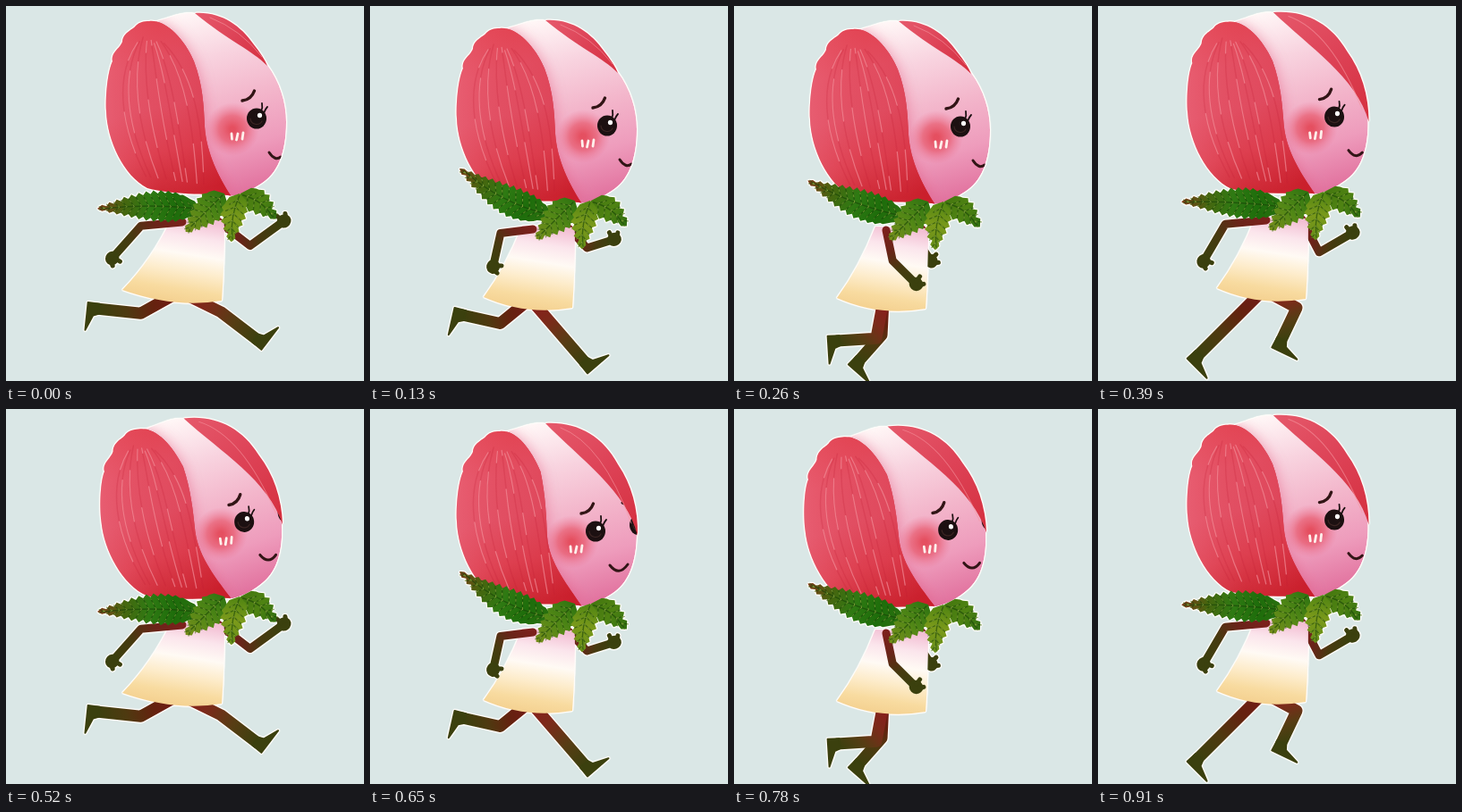
Recreate the animation shown at these times as an HTML page with a canvas. Size 400 by 420 pixels, loop 1040 ms.

```html
<!DOCTYPE html>
<html lang="en">
<head>
<meta charset="utf-8">
<title>Running tulip</title>
<style>
html, body { margin: 0; width: 100%; height: 100%; overflow: hidden; background: #dae7e6; }
canvas { display: block; }
</style>
</head>
<body>
<canvas id="stage" width="400" height="420"></canvas>
<script>
const STEP = 130;
const STEPS = 8;
const WIDTH = 400;
const HEIGHT = 420;
const INK = '#1c1011';
const BARK = '#3b400e';

// Everything hangs from the collar. Limbs end at x, y and bow out by a bend.
const NEAR_SHOULDER = [-47, 32];
const FAR_SHOULDER = [-7, 31];
const HIP = [-50, 110];
const poses = [
  { collar: [244, 210], lift: 0, sway: 12,
    nearArm: [-124, 71, 17], farArm: [65, 32, 27], farLeg: [-143, 129, 15], nearLeg: [37, 164, 5] },
  { collar: [229, 218], lift: 0.48, sway: 0,
    nearArm: [-91, 72, 21], farArm: [42, 44, 16], farLeg: [-126, 128, 19], nearLeg: [12, 182, 0] },
  { collar: [217, 219], lift: 0.36, sway: 0,
    nearArm: [-15, 91, 10], farArm: [2, 65, 6], farLeg: [-78, 179, 13], nearLeg: [-102, 156, 27] },
  { collar: [235, 208], lift: 0.05, sway: 0,
    nearArm: [-116, 76, 21], farArm: [48, 47, 30], farLeg: [-124, 184, 0], nearLeg: [-31, 168, 29] }
];

function makeLayer() {
  const canvas = document.createElement('canvas');
  canvas.width = WIDTH;
  canvas.height = HEIGHT;
  return canvas.getContext('2d');
}

const stage = document.getElementById('stage').getContext('2d');
const g = makeLayer();
const mask = makeLayer();

function random(seed) {
  const v = Math.sin(seed * 91.7) * 4375.5;
  return v - Math.floor(v);
}

function gradient(x0, y0, x1, y1, ...colors) {
  const paint = g.createLinearGradient(x0, y0, x1, y1);
  colors.forEach((c, i) => paint.addColorStop(i / (colors.length - 1), c));
  return paint;
}

function fill(path, style) {
  g.fillStyle = style;
  g.fill(new Path2D(path));
}

function line(path, style, width) {
  g.strokeStyle = style;
  g.lineWidth = width;
  g.stroke(new Path2D(path));
}

function disc(x, y, rx, ry, style) {
  g.fillStyle = style;
  g.beginPath();
  g.ellipse(x, y, rx, ry, 0, 0, 7);
  g.fill();
}

// Draws a jointed limb and returns the angle of its lower half.
function limb([x0, y0], [x1, y1], bend, width, ...colors) {
  const dx = x1 - x0, dy = y1 - y0, d = Math.hypot(dx, dy);
  const jx = (x0 + x1) / 2 - dy / d * bend;
  const jy = (y0 + y1) / 2 + dx / d * bend;
  line(`M${x0} ${y0}L${jx} ${jy}L${x1} ${y1}`, gradient(x0, y0, x1, y1, ...colors), width);
  return Math.atan2(y1 - jy, x1 - jx);
}

// Continues a limb: local y runs along it, local x points forward.
function atEnd(x, y, angle, paint) {
  g.save();
  g.translate(x, y);
  g.rotate(angle - Math.PI / 2);
  paint();
  g.restore();
}

function arm(shoulder, [x, y, bend]) {
  const angle = limb(shoulder, [x, y], bend, 9, '#7c201c', '#6a2419', '#473a10', BARK);
  atEnd(x, y, angle, () => {
    disc(0, 2, 7.5, 8, BARK);
    line('M3 0L9 -1M2 6L6 8', BARK, 5);
  });
}

function leg([x, y, bend], ...colors) {
  const angle = limb(HIP, [x, y], -bend, 13, ...colors, BARK);
  atEnd(x, y, angle, () => {
    const foot = 'M-5.5 -3L-6 10L25 10L8 3L5.5 -3Z';
    fill(foot, BARK);
    line(foot, BARK, 2);
  });
}

function leaf(x, y, angle, length, half, bend, ...colors) {
  const teeth = Math.round(length / 8);
  const mid = t => bend * Math.sin(Math.PI * t);
  const edge = t => half * Math.sin(Math.PI * t ** 0.65);
  const tooth = (t, side) => [
    [t * length - 2, mid(t) + side * edge(t) * 0.86],
    [t * length + 3, mid(t) + side * (edge(t) + 1)]
  ];
  const upper = [], lower = [];
  let veins = '';
  for (let i = 1; i < teeth; i++) {
    const t = i / teeth, vx = t * length, vy = mid(t), reach = edge(t) * 0.7;
    upper.push(...tooth(t, -1));
    lower.push(...tooth(t, 1));
    veins += `M${vx} ${vy}L${vx + 6} ${vy + reach}M${vx} ${vy}L${vx + 6} ${vy - reach}`;
  }
  g.save();
  g.translate(x, y);
  g.rotate(angle);
  fill('M' + [[0, 0], ...lower, [length, 0], ...upper.reverse()].join('L') + 'Z',
    gradient(0, 0, length, 0, ...colors));
  line(veins, 'rgba(22,66,8,.55)', 1.3);
  line(`M3 0Q${length / 2} ${bend * 2} ${length - 6} 0`, 'rgba(24,66,8,.6)', 1.4);
  g.setLineDash([2, 4]);
  line(veins, 'rgba(182,204,84,.6)', 0.8);
  g.restore();
}

function collarLeaves(lift) {
  leaf(-27, 17, Math.PI + lift, 115, 17, 3 - 20 * lift, '#2c7010', '#1e6d0b', '#2f7a13', '#47650f', '#7f3a1a');
  leaf(18, 0, 0.62, 49, 14, -4, '#44770f', '#4f8313', '#2f6d10');
  leaf(0, 0, 2.36, 61, 17, 0, '#2f7411', '#538816', '#778d1b');
  leaf(17, 0, 1.74, 55, 14, 3, '#4f8412', '#7b9a1b', '#668e18');
}

function dress(sway) {
  fill(`M-59 28Q${-77 - sway / 3} 74 ${-102 - sway} 108Q-55 129 -3 120Q0 80 0 30Z`,
    gradient(-40, 28, -56, 126, '#f3bfd4', '#fbe5ec', '#fffaf4', '#fdeccb', '#f8dba0', '#f3ce8c'));
}

function eye(x, y) {
  disc(x, y, 11, 11.5, INK);
  line(`M${x - 7} ${y}A7 7 0 0 0 ${x + 6} ${y + 3}`, '#3c2523', 1.2);
  disc(x + 3.5, y - 3.5, 2.6, 2.8, '#fff');
}

function face(turn) {
  g.save();
  g.translate(-13 * turn, 3 * turn);
  const blush = g.createRadialGradient(253, 138, 3, 253, 138, 30);
  blush.addColorStop(0, 'rgba(226,58,72,.8)');
  blush.addColorStop(0.45, 'rgba(230,74,92,.6)');
  blush.addColorStop(1, 'rgba(236,110,140,0)');
  disc(253, 138, 30, 30, blush);
  line('M252 143L252.5 149M259 143L257.5 150M265 142L264 149', '#fff0ec', 2.8);
  line('M264 106Q274 105 277.5 95', '#321516', 3.4);
  line('M285 118Q287 114 286 109M288 120Q290 115 292 113', INK, 1.8);
  eye(280, 126);
  if (turn > 0.5) {
    eye(329, 119);
    line('M310 94L318 97', '#321516', 3);
  }
  g.restore();
  const a = 294 - 11 * turn, b = 307 - 4 * turn;
  line(`M${a} ${164 + 3 * turn}Q${(a + b) / 2} ${174 + 6 * turn} ${b} ${169 - 3 * turn}`, '#321516', 3);
}

function sidePetalPath(s) {
  return `M160 17C178 15 ${199 + s / 2} 36 ${210 + s / 2} 62C${220 + s} 88 ${221 + s} 112 ${222 + s} 135
    C${224 + s} 165 238 192 251 212C225 211 182 211 158 204C131 190 113 150 112 118
    C111 98 114 72 119 62C117 52 127 48 130 40C131 29 143 26 145 22C149 18 154 17 160 17Z`;
}

function sidePetal(s) {
  const path = sidePetalPath(s);
  fill(path, gradient(142, 18, 188, 212, '#e2414f', '#e24d60', '#e04c60', '#dc3c4c', '#c9212c'));
  fill(path, gradient(110, 0, 240, 0, 'rgba(242,120,140,.4)', 'rgba(230,85,105,.1)', 'rgba(205,25,45,.25)'));
  for (let i = 0; i < 9; i++) {
    const u = (i + 0.3 + 0.6 * random(i + 1)) / 9;
    const streak = `M${144 + 34 * u} ${34 + 8 * random(i + 5)}C${114 + 100 * u} 76
      ${116 + (108 + s) * u} 130 ${150 + 74 * u} ${190 + 10 * u}`;
    line(streak, 'rgba(190,30,50,.22)', 1.4);
    g.setLineDash([20 + 50 * random(i + 9), 30 + 30 * random(i + 13)]);
    g.lineDashOffset = 90 * random(i + 17);
    line(streak, 'rgba(250,155,165,.6)', 1.3);
    g.setLineDash([]);
  }
}

function backPetal(turn) {
  const r = Math.min(1, turn * 3);
  const x = 292 + 21 * r, y = 67 + 63 * r;
  const path = `M211 8C${240 + 6 * r} 6 ${262 + 13 * r} 22 ${276 + 16 * r} ${42 + 12 * r}
    Q${288 + 27 * r} ${57 + 31 * r} ${x + r} ${y + 4 * r}C${274 + 28 * r} ${49 + 35 * r} 250 ${40 + 8 * r} 211 8Z`;
  fill(path, gradient(220, 5, x, y, '#e5586a', '#dd4256', '#d5303f'));
  line(`M228 13Q${262 + 13 * r} ${26 + 5 * r} ${x - 6} ${y - 10}`, 'rgba(247,150,160,.6)', 1);
}

function head(turn) {
  const skull = `M156 20C184 14 192 7 208 8C226 12 247 22 264 38L292 66C306 85 313 108 313 130
    C313 165 303 188 285 199C273 207 262 212 250 213L190 190L150 60Z`;
  const shift = -9 * turn;
  g.save();
  g.rotate(-0.42 * turn * turn * (1 - turn));
  g.translate(-246, -211);
  g.translate(2, 1);
  g.save();
  g.clip(new Path2D(skull));
  fill(skull, gradient(205, 8, 262, 212, '#fff6f6', '#f8d3df', '#f3b6cb', '#ee9cbc', '#e1709d'));
  g.shadowColor = 'rgba(224,80,120,.55)';
  g.shadowBlur = 16;
  fill(sidePetalPath(shift), '#d83c4c');
  g.shadowColor = 'transparent';
  face(turn);
  g.restore();
  backPetal(turn);
  sidePetal(shift);
  g.restore();
}

function drawFigure(pose, turn) {
  g.clearRect(0, 0, WIDTH, HEIGHT);
  g.lineCap = g.lineJoin = 'round';
  g.save();
  g.translate(...pose.collar);
  arm(FAR_SHOULDER, pose.farArm);
  leg(pose.farLeg, '#741a18', '#65220f', '#4e3a10');
  leg(pose.nearLeg, '#8a1c1c', '#7c2a1a', '#573d14');
  dress(pose.sway);
  arm(NEAR_SHOULDER, pose.nearArm);
  head(turn);
  collarLeaves(pose.lift);
  g.restore();
}

function draw(step) {
  // The face turns towards the viewer and back around the sixth step.
  drawFigure(poses[step % poses.length], Math.max(0, 1 - Math.abs(step - 5) / 3));
  mask.globalCompositeOperation = 'copy';
  mask.drawImage(g.canvas, 0, 0);
  mask.globalCompositeOperation = 'source-in';
  mask.fillStyle = '#fffdfa';
  mask.fillRect(0, 0, WIDTH, HEIGHT);
  stage.fillStyle = '#dae7e6';
  stage.fillRect(0, 0, WIDTH, HEIGHT);
  for (let i = 0; i < 8; i++) {
    const a = i * Math.PI / 4;
    stage.drawImage(mask.canvas, 1.2 * Math.cos(a), 1.2 * Math.sin(a));
  }
  stage.drawImage(g.canvas, 0, 0);
}

const start = performance.now();
let shown = -1;
function tick() {
  const step = Math.floor((performance.now() - start) / STEP) % STEPS;
  if (step !== shown) draw(shown = step);
  requestAnimationFrame(tick);
}
tick();
</script>
</body>
</html>
```
